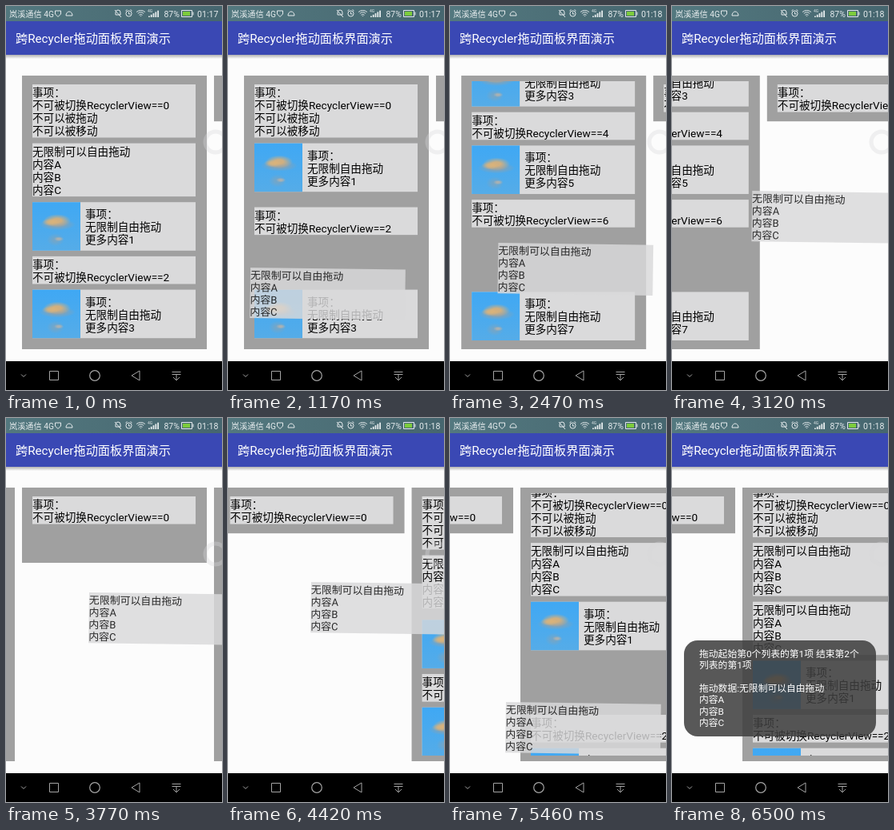
An HTML page with a canvas that plays this animation: 270x480 px, repeating every 6.63 s.

```html
<!DOCTYPE html>
<html lang="zh-CN">
<head>
<meta charset="utf-8">
<style>
html, body { margin: 0; width: 100%; height: 100%; overflow: hidden; background: #fcfcfc; }
canvas { display: block; width: 270px; height: 480px; }
</style>
</head>
<body>
<canvas id="stage"></canvas>
<script>
const LOOP = 6630, STEP = 130;
const PICK = 390, DROP = 6110;
const GAP = 7.1, LINE = 16;
const canvas = document.getElementById('stage');
const c = canvas.getContext('2d');
const dpr = window.devicePixelRatio || 1;
canvas.width = 270 * dpr;
canvas.height = 480 * dpr;
let now = 0;

// Progress from 0 to 1 between two times, even or eased.
const clamp = v => Math.max(0, Math.min(1, v));
const ramp = (a, b) => clamp((now - a) / (b - a));
const ease = (a, b) => { const u = ramp(a, b); return u * u * (3 - 2 * u); };

function text(str, x, y, size, color) {
  c.font = `${size}px Roboto, "Noto Sans CJK SC", "Noto Sans CJK", sans-serif`;
  c.fillStyle = color;
  c.fillText(str, x, y);
}
function rect(x, y, w, h, color) {
  c.fillStyle = color;
  c.fillRect(x, y, w, h);
}
function shade(x0, y0, x1, y1, from, to) {
  const g = c.createLinearGradient(x0, y0, x1, y1);
  g.addColorStop(0, from);
  g.addColorStop(1, to);
  return g;
}
function stroke(d, x, y, color) {
  c.save();
  c.translate(x, y);
  c.strokeStyle = color;
  c.lineWidth = 1;
  c.stroke(new Path2D(d));
  c.restore();
}
function ring(x, y, r, color, width = 1, from = 0, to = 7) {
  c.strokeStyle = color;
  c.lineWidth = width;
  c.beginPath();
  c.arc(x, y, r, from, to);
  c.stroke();
}
// Soft-edged ellipse; rgb is "r,g,b".
function puff(x, y, rx, ry, rgb, alpha) {
  c.save();
  c.translate(x, y);
  c.scale(rx, ry);
  const g = c.createRadialGradient(0, 0, 0, 0, 0, 1);
  g.addColorStop(0.3, `rgba(${rgb},${alpha})`);
  g.addColorStop(1, `rgba(${rgb},0)`);
  rect(-1, -1, 2, 2, g);
  c.restore();
}

// Cards
const fixed = n => ({ h: 34.6, lines: ['事项：', '不可被切换RecyclerView==' + n] });
const photo = n => ({ h: 60.6, photo: true, lines: ['事项：', '无限制自由拖动', '更多内容' + n] });
const locked = { h: 66.5, lines: [...fixed(0).lines, '不可以被拖动', '不可以被移动'] };
const free = { h: 66.5, lines: ['无限制可以自由拖动', '内容A', '内容B', '内容C'] };
const tail = [1, 2, 3, 4, 5, 6, 7].map(n => n % 2 ? photo(n) : fixed(n));
const lists = [[locked, ...tail], [fixed(0)], [locked, free, ...tail]];
const SLOT = free.h + GAP;

function sky(x, y) {
  rect(x, y, 60, 60.6, shade(0, y, 0, y + 60, '#3fa8f4', '#55ace8'));
  puff(x + 31, y + 28, 23, 7, '150,160,165', 0.8);
  puff(x + 31, y + 23, 17, 8, '214,176,124', 0.95);
  puff(x + 23, y + 25, 11, 5, '222,180,120', 0.8);
  puff(x + 29, y + 47, 11, 8, '120,165,195', 0.8);
  puff(x + 33, y + 46, 6, 3, '185,180,172', 0.8);
}
function card(item, x, y) {
  rect(x, y, 204, item.h, '#dadadb');
  if (item.photo) sky(x, y);
  const dx = item.photo ? 66 : 0, dy = item.photo ? 20 : 15;
  item.lines.forEach((s, i) => text(s, x + dx, y + dy + i * LINE, 13.6, '#000'));
}

// The gap sits before index `at` (fractional while cards slide), opened by `open`.
function panel(items, x, at, open, scroll, placed) {
  const total = items.reduce((sum, it) => sum + it.h + GAP, 0) + SLOT * open;
  rect(x, 87, 231, Math.min(342, total + 15.5), '#a0a0a0');
  c.save();
  c.beginPath();
  c.rect(x, 94, 231, 328);
  c.clip();
  let y = 98 - scroll;
  items.forEach((item, i) => {
    if (placed && i === Math.round(at)) card(free, x + 13, y);
    card(item, x + 13, y + SLOT * open * clamp(i + 1 - at));
    y += item.h + GAP;
  });
  c.restore();
}

function board() {
  const left = 20 - 240 * ease(2340, 3735) - 172 * ease(4200, 5021);
  const open0 = 1 - ease(3380, 3640);
  const open1 = ease(3640, 3900) - ease(4160, 4420);
  const open2 = ease(4370, 4630);
  const at0 = 1 + 2 * ease(520, 1310) + 4 * ramp(1310, 1690) + ease(1820, 2080) - ease(2210, 2470);
  const at2 = 2 + ease(4940, 5200) - ease(5590, 5850);
  const scroll0 = 216 * ramp(1235, 1820) - SLOT * (1 - open0);
  panel(lists[0], left, at0, open0, scroll0, now < PICK);
  panel(lists[1], left + 240, 1, open1, 0, false);
  panel(lists[2], left + 480, at2, open2, 15.5 * ramp(5070, 5330), now >= DROP);
}

function dragged() {
  if (now < PICK || now >= DROP) return;
  const x = 33 - 6 * ease(390, 1460) + 77 * ease(1750, 3330) - 38 * ease(4420, 5720) + 36 * ease(5720, DROP);
  const y = 172 + 189 * ease(390, 1460) - 130 * ease(1820, 3120) - 26 * ease(3120, 4420)
    + 150 * ease(4420, 5400) - 125 * ease(5460, DROP);
  c.save();
  c.globalAlpha = 0.82;
  c.translate(x, y);
  c.rotate(0.014);
  c.scale(0.95, 0.95);
  card(free, 0, 0);
  c.restore();
}

function toast() {
  c.save();
  c.globalAlpha = ramp(DROP, 6370);
  c.fillStyle = 'rgba(62,62,62,.86)';
  c.beginPath();
  c.roundRect(15, 278, 240, 120, 17);
  c.fill();
  ['拖动起始第0个列表的第1项 结束第2个', '列表的第1项', '', '拖动数据:无限制可以自由拖动', ...free.lines.slice(1)]
    .forEach((s, i) => text(s, 34, 298.5 + i * 14.4, 11.8, '#fff'));
  c.restore();
}

function toolbar() {
  rect(0, 61, 270, 5, shade(0, 61, 0, 66, 'rgba(0,0,0,.3)', 'rgba(0,0,0,0)'));
  rect(0, 19, 270, 42, '#3a48b4');
  text('跨Recycler拖动面板界面演示', 12, 46, 15.2, '#fff');
}

function statusBar() {
  const ink = '#e4eaec';
  rect(0, 0, 270, 19, shade(0, 0, 270, 0, '#53787f', '#46666f'));
  text('岚溪通信 4G', 4, 13.5, 10.2, ink);
  stroke('M-3.5-3H3.5V1L0 4.5L-3.5 1Z', 65, 9, ink);
  stroke('M-4 3A4 5 0 0 1 4 3Z', 79, 9, ink);
  // Muted bell, alarm clock, Wi-Fi, signal, battery
  stroke('M-3 2V-1A3 3 0 0 1 3-1V2ZM-4-4L4 5', 140, 9, ink);
  ring(153.5, 9.5, 3.6, ink);
  stroke('M0-2V.5H2M-4-3.5L-2-5M2-5L4-3.5', 153.5, 9.5, ink);
  for (const r of [1, 3, 5.5, 8]) ring(168.5, 13.5, r, ink, 1, -2.3, -0.84);
  text('4G', 177, 8, 5, ink);
  for (let i = 0; i < 5; i++) rect(178 + i * 2.8, 12.5 - i * 1.7, 1.8, 1.5 + i * 1.7, ink);
  text('87%', 197.5, 13.5, 10.4, ink);
  stroke('M0 0H13V8H0ZM14.5 2V6', 219.5, 5.5, ink);
  rect(221, 7, 9, 5, '#7ccb3c');
  text(now < 1560 ? '01:17' : '01:18', 239, 13.5, 10.6, ink);
}

function navBar() {
  const ink = '#a4a4a4';
  rect(0, 444, 270, 36, '#000');
  stroke('M-3-1.5L0 1.5L3-1.5', 22, 462, ink);
  stroke('M-5.5-5.5H5.5V5.5H-5.5Z', 60, 462, ink);
  ring(111, 462, 6.3, ink, 1.2);
  stroke('M5-6L-5 0L5 6Z', 162, 462, ink);
  stroke('M-5.5-4.5H5.5M-5.5-1.5H5.5M0-1.5V6M-4 2L0 6L4 2', 213, 462, ink);
}

function draw() {
  c.setTransform(dpr, 0, 0, dpr, 0, 0);
  rect(0, 0, 270, 480, '#fcfcfc');
  board();
  dragged();
  ring(262, 170, 13, 'rgba(215,215,218,.35)', 5);
  toast();
  toolbar();
  statusBar();
  navBar();
}

const start = performance.now();
function tick() {
  const t = (performance.now() - start) % LOOP;
  now = Math.floor(t / STEP) * STEP;
  draw();
  requestAnimationFrame(tick);
}
tick();
</script>
</body>
</html>
```
